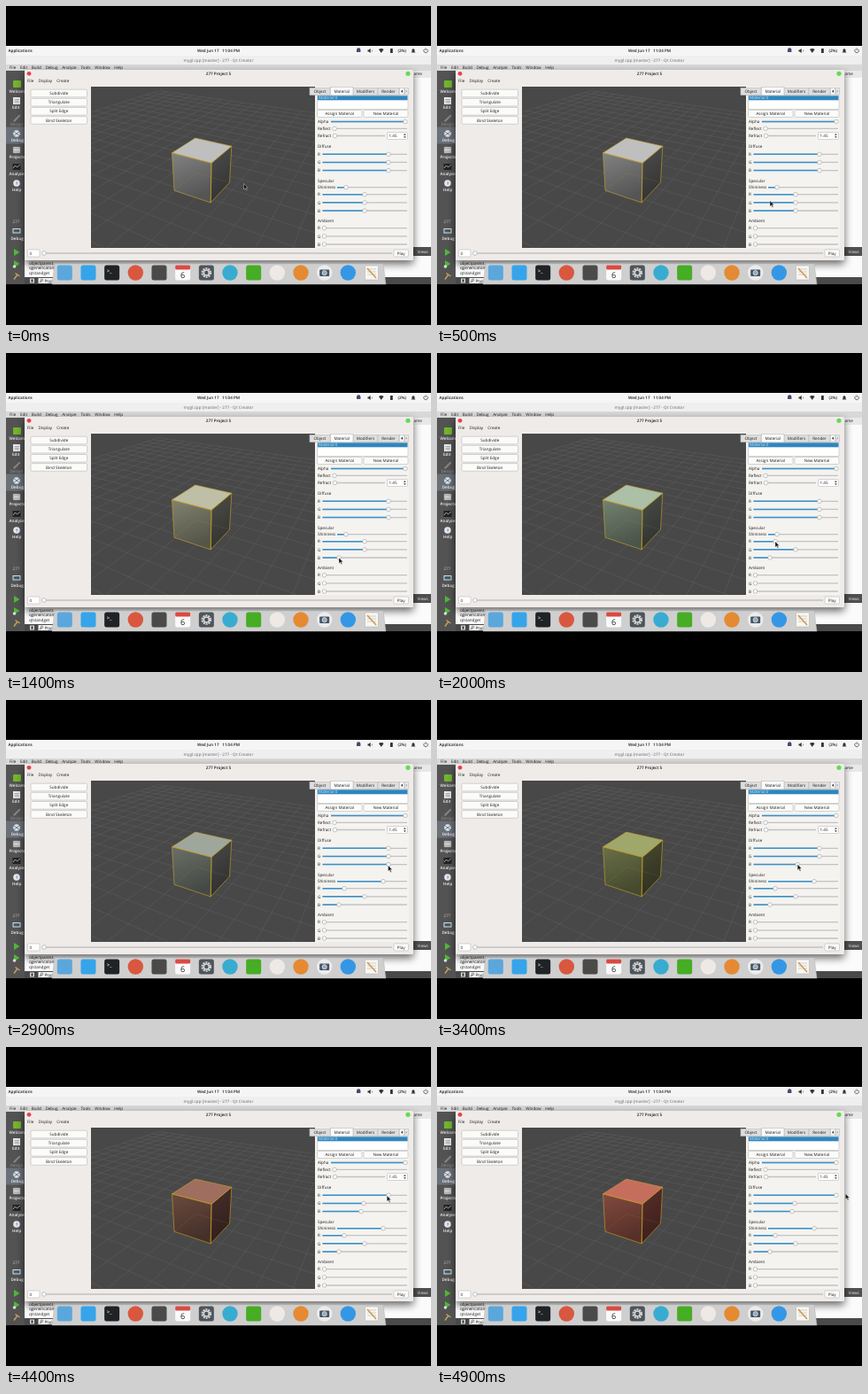
Write an HTML page that moves like this. It is 480 px wide and 360 px high and loops after 5 s.

```html
<!DOCTYPE html>
<html lang="en">
<head>
<meta charset="utf-8">
<title>Material sliders</title>
<style>
html, body { margin: 0; width: 100%; height: 100%; overflow: hidden; background: #000; }
svg { display: block; width: 100vw; height: 100vh; font: 4.6px "Open Sans", "Noto Sans", sans-serif; text-rendering: geometricPrecision; }
text { white-space: pre; }
</style>
</head>
<body>
<svg id="stage" viewBox="0 0 480 360"></svg>
<script>
const stage = document.getElementById('stage');
const parts = [];
const add = s => parts.push(s);
const rect = (x, y, w, h, fill, more = '') =>
  add(`<rect x="${x}" y="${y}" width="${w}" height="${h}" fill="${fill}" ${more}/>`);
const circle = (x, y, r, fill, more = '') =>
  add(`<circle cx="${x}" cy="${y}" r="${r}" fill="${fill}" ${more}/>`);
const path = (d, more) => add(`<path d="${d}" ${more}/>`);
const text = (x, y, s, more = '', fill = '#1c1c1c') =>
  add(`<text x="${x}" y="${y}" fill="${fill}" ${more}>${s}</text>`);
const mid = 'text-anchor="middle"';
const bold = 'font-weight="600"';
const outline = 'stroke="#b9b9b9" stroke-width=".6"';

function button(x, y, w, h, label) {
  rect(x, y, w, h, '#fbfbfa', `rx="1.2" ${outline}`);
  text(x + w / 2, y + h / 2 + 1.6, label, mid);
}

// Knobs that move later are kept by id.
const sliders = {};
function slider(x0, x1, y, value, id) {
  sliders[id] = { x0, x1, y, value };
  path(`M${x0} ${y}H${x1}`, 'stroke="#c2c2c2" stroke-width="1.3"');
  path(`M${x0} ${y}H${value}`, `id="${id}Fill" stroke="#3590c8" stroke-width="1.5"`);
  circle(value, y, 2.3, '#fcfcfc', `id="${id}Knob" stroke="#a2a2a2" stroke-width=".6"`);
}

function desktop() {
  rect(0, 45, 480, 269, '#f5f5f5');
  text(2.5, 52.2, 'Applications', bold);
  text(240, 52.2, 'Wed Jun 17   11:04 PM', mid + ' ' + bold);
  path('M396 52V49.5a2.2 2.2 0 0 1 4.4 0V52z', 'fill="#4e4670"');
  path('M408.5 49.5h1.2l2-1.5v5l-2-1.5h-1.2zM413 49q1.2 1.5 0 3', 'fill="#333"');
  path('M421 49q2.8-2.2 5.6 0L423.8 53z', 'fill="#333"');
  rect(434, 48, 2.8, 5, '#333', 'rx=".5"');
  text(442.5, 52.2, '(2%)', bold);
  path('M457.5 52.5l1-1v-1.8a1.5 1.5 0 0 1 3 0v1.8l1 1z', 'fill="#333"');
  path('M472.6 48.7a2.3 2.3 0 1 0 3 0M474.1 47.5v2.5', 'fill="none" stroke="#333" stroke-width=".7"');

  rect(0, 56, 480, 10, '#efefef');
  text(240, 62.6, 'mygl.cpp [master] - 277 - Qt Creator', mid + ' ' + bold, '#858585');
  rect(0, 66, 480, 7, '#d8d8d8');
  text(4, 71.2, 'File Edit Build Debug Analyze Tools Window Help', 'word-spacing="3.5"');
  rect(0, 73, 480, 8, '#e8e8e8');
  text(460.5, 77.8, 'ame');
  rect(460, 81, 20, 191, '#fbfbfb');
  rect(460, 272, 20, 10, '#505050');
  text(464.5, 278.5, 'Views', '', '#eee');
  rect(21, 282, 459, 24, '#fbfbfb');
  ['objectparent', 'qgenericatomic', 'qtstandget'].forEach((s, i) => text(26, 291.5 + i * 5.8, s));
  rect(0, 306, 480, 8, '#4a4a4a');
}

function sidebar() {
  rect(0, 73, 21, 241, '#535353');
  rect(0, 136.5, 21, 19, '#6a7078');
  add('<g clip-path="url(#side)">');
  ['Welcome', 'Edit', 'Design', 'Debug', 'Projects', 'Analyze', 'Help'].forEach((s, i) =>
    text(Math.max(3.5, 12 - s.length * 1.25), 97.5 + i * 18.6, s, bold, s === 'Design' ? '#858585' : '#f0f0f0'));
  text(7.5, 245, '277', '', '#c5c5c5');
  text(5.5, 263.5, 'Debug', bold, '#eee');
  add('</g>');
  rect(8, 84, 9, 8, '#72b52c', 'rx="1"');
  rect(8, 103, 8, 8, '#e8e8e8');
  path('M9.5 105.5h5M9.5 107.3h5M9.5 109h5', 'stroke="#777" stroke-width=".6"');
  path('M8 129.5l7-7 1.5 1.5-7 7z', 'fill="#858585"');
  circle(12, 144, 3.8, '#dde3ea');
  path('M8 141l8 6M16 141l-8 6', 'stroke="#46566a" stroke-width=".7"');
  path('M8 159h8v7h-8zM9 161h6M9 164h6', 'fill="#ddd" stroke="#777" stroke-width=".7"');
  rect(7.5, 178, 9, 7, '#222');
  path('M8 183l2.5-3 2 2 3.5-3', 'fill="none" stroke="#ddd" stroke-width=".7"');
  circle(12, 200, 3.8, '#e3e8ee');
  text(12, 202, '?', mid + ' font-weight="700"', '#4775a3');
  rect(7.5, 251, 9, 5.5, '#dedede');
  rect(8.5, 252, 7, 3.5, '#405e70');
  path('M9 274v8l6.5-4zM9 287v8l6.5-4z', 'fill="#4dba35"');
  circle(9.5, 294, 1.8, '#ddd');
  path('M9 308.5l4-5.5M10.5 301.5l5 3.5', 'stroke="#c3a05b" stroke-width="1.5"');
  rect(27, 307.5, 5, 5, '#ddd');
  rect(28.5, 308.5, 2, 3, '#333');
  rect(36.5, 307, 20, 6, '#f5f5f5');
  path('M38 312l1.8-2', 'stroke="#333" stroke-width=".8"');
  circle(40.5, 309.3, 1.2, 'none', 'stroke="#333" stroke-width=".6"');
  text(43.5, 311.8, 'Ptype');
}

// Orbiting camera aimed at the origin; null when a point is too close.
const TURN = 30 * Math.PI / 180, TILT = 28.5 * Math.PI / 180, DIST = 6.5, FOCAL = 308;
function project(x, y, z) {
  const side = x * Math.cos(TURN) + z * Math.sin(TURN);
  const ahead = z * Math.cos(TURN) - x * Math.sin(TURN);
  const depth = DIST + ahead * Math.cos(TILT) - y * Math.sin(TILT);
  const up = ahead * Math.sin(TILT) + y * Math.cos(TILT);
  return depth < .5 ? null
    : [222 + FOCAL * side / depth, 183.5 - FOCAL * up / depth].map(v => +v.toFixed(1));
}

function line(points) {
  let d = '', pen = 'M';
  for (const p of points.map(q => project(...q))) {
    if (p) d += pen + p.join(' ');
    pen = p ? 'L' : 'M';
  }
  return d;
}

function gridPath(half, cell) {
  const marks = Array.from({ length: 2 * half / cell + 1 }, (_, i) => i * cell - half);
  return marks.map(a => line(marks.map(b => [a, 0, b])) + line(marks.map(b => [b, 0, a]))).join('');
}

// Corners run clockwise from the left: left, back, right, front.
const corner = (i, y) => [i < 2 ? -.5 : .5, y, i % 3 ? .5 : -.5];
const loop = points => line(points) + 'z';
const wall = (a, b) => loop([corner(a, .5), corner(b, .5), corner(b, -.5), corner(a, -.5)]);
const faces = {
  top: { d: loop([0, 1, 2, 3].map(i => corner(i, .5))), diffuse: .76, shine: .36 },
  left: { d: wall(0, 3), diffuse: .5, shine: .28 },
  right: { d: wall(3, 2), diffuse: .36, shine: .06 }
};

function viewport() {
  rect(96, 91, 253, 182, '#484848');
  path(gridPath(6, .5), 'clip-path="url(#view)" fill="none" stroke="#767676" stroke-width=".4" opacity=".6"');
  const thin = 'fill="none" stroke-linejoin="round" stroke="#c9a42a"';
  for (const id in faces) {
    path(faces[id].d, `id="${id}"`);
    if (id !== 'top') path(faces[id].d, 'fill="url(#shade)"');
  }
  path(line([0, 1, 2].map(i => corner(i, -.5))), thin + ' stroke-width=".4" opacity=".3"');
  for (const id in faces) path(faces[id].d, thin + ' stroke-width=".6"');
}

function tab(x, w, label, active) {
  rect(x, active ? 91.5 : 92.5, w, active ? 9.5 : 8, active ? '#fafafa' : '#dedede', outline);
  text(x + w / 2, 98, label, mid);
}

function colorGroup(title, y, value, key) {
  text(352, y, title);
  [...'RGB'].forEach((c, i) => {
    const rowY = y + (key === 'spec' ? 13.7 : 7.1) + i * 9.15;
    text(352, rowY + 1.7, c);
    slider(357.5, 453, rowY, value, key + c);
  });
}

function panel() {
  rect(349, 91, 106, 182, '#f4f3f0');
  add('<g clip-path="url(#view)">');
  tab(343, 23, 'Object');
  tab(392, 28, 'Modifiers');
  tab(420, 24, 'Render');
  tab(366.5, 25.5, 'Material', true);
  rect(444.5, 92.5, 5, 7.5, '#fafafa', outline);
  rect(450, 92.5, 4.5, 7.5, '#e8e8e8', outline);
  path('M448 94.5v3.6l-2-1.8z', 'fill="#333"');
  path('M451.5 94.5v3.6l1.8-1.8z', 'fill="#aaa"');
  rect(351.5, 101, 102.5, 15.5, '#fff', outline);
  rect(352, 101.3, 101.5, 5, '#2f86bd');
  text(353, 105.3, 'Material 0', '', '#d8edf8');
  button(351.5, 117.5, 50.5, 8, 'Assign Material');
  button(404, 117.5, 50, 8, 'New Material');
  text(352, 132, 'Alpha');
  slider(367, 453, 130.5, 451, 'alpha');
  text(352, 139.8, 'Reflect');
  slider(370, 453, 138.3, 371, 'reflect');
  text(352, 148.2, 'Refract');
  slider(371, 428, 146.5, 371.5, 'refract');
  rect(430.5, 142.5, 23, 8, '#fff', `rx="1" ${outline}`);
  text(432.5, 148.2, '1.45');
  path('M449 145.8l1.4-1.8 1.4 1.8zM449 147.3l1.4 1.8 1.4-1.8z', 'fill="#333"');
  colorGroup('Diffuse', 160.2, 432, 'diff');
  colorGroup('Specular', 199, 405, 'spec');
  text(352, 206.3, 'Shininess');
  slider(374, 453, 204.7, 384, 'shine');
  colorGroup('Ambient', 243.6, 359.5, 'amb');
  add('</g>');
}

function appWindow() {
  rect(21, 76, 439, 215, '#000', 'opacity=".6" filter="url(#blur)" clip-path="url(#desk)"');
  rect(21, 72, 439, 215, '#efebe9', 'rx="1.5"');
  circle(26, 76.3, 2.4, '#e8404a');
  circle(454, 76.3, 2.6, '#62dc52');
  text(240, 78, '277 Project 5', mid + ' ' + bold);
  text(24, 85.5, 'File Display Create', 'word-spacing="4"');
  ['Subdivide', 'Triangulate', 'Split Edge', 'Bind Skeleton']
    .forEach((s, i) => button(28, 94.2 + i * 10.15, 63.5, 8.6, s));
  viewport();
  panel();
  rect(24.5, 275, 13.5, 8, '#fff', `rx="1" ${outline}`);
  text(26.5, 280.8, '0');
  slider(41, 436, 279, 43, 'time');
  button(438, 275, 16.5, 8, 'Play');
}

function dock() {
  path('M55 291H426L429 314H52z', 'fill="#cfcfcf" stroke="#b5b5b5" stroke-width=".5"');
  const at = i => 66.3 + i * 26.67;
  const tiles = { 0: '#5ba7dc', 1: '#36a4ea', 2: '#202326', 4: '#4b4a48', 5: '#fafafa', 6: '#4e555b', 8: '#46ad24' };
  const discs = { 3: '#d9573f', 7: '#38acd0', 9: '#efe9e5', 10: '#e58a32', 11: '#ececec', 12: '#3497e6' };
  for (const i in tiles) rect(at(i) - 8.5, 292.5, 17, 17, tiles[i], 'rx="2.5"');
  for (const i in discs) circle(at(i), 301, 8.7, discs[i]);
  text(at(2) - 6, 301, '&gt;_', 'font-size="6" ' + bold, '#e5e5e5');
  rect(at(5) - 8.5, 292.5, 17, 5, '#d94a42', 'rx="1.5"');
  text(at(5), 306.5, '6', mid + ' font-size="9"');
  circle(at(6), 301, 4.8, 'none', 'stroke="#dadada" stroke-width="2" stroke-dasharray="2 1.015"');
  circle(at(6), 301, 3, '#4e555b', 'stroke="#dadada" stroke-width="1.5"');
  rect(at(11) - 5.5, 297.5, 11, 7.5, '#495563', 'rx="1"');
  circle(at(11), 301.2, 2.6, '#8eabc2', 'stroke="#eee" stroke-width=".7"');
  rect(at(13) - 7.5, 293, 15, 16, '#f8f6ef', 'rx="1" stroke="#aaa" stroke-width=".5"');
  path('M408 297h10M408 300h10M408 303h10', 'stroke="#b5c2c6" stroke-width=".7"');
  path('M408 296l10 11', 'stroke="#d39852" stroke-width="1.6"');
}

add(`<defs>
  <clipPath id="desk"><rect y="45" width="480" height="269"/></clipPath>
  <clipPath id="side"><rect y="73" width="21" height="241"/></clipPath>
  <clipPath id="view"><rect x="96" y="91" width="253" height="182"/><rect x="349" y="91" width="106" height="181.5"/></clipPath>
  <filter id="blur"><feGaussianBlur stdDeviation="5"/></filter>
  <linearGradient id="shade" x1="0" y1="0" x2=".3" y2="1"><stop stop-opacity="0"/><stop offset="1" stop-opacity=".35"/></linearGradient>
</defs>`);
rect(0, 0, 480, 360, '#000');
desktop();
sidebar();
appWindow();
dock();
path('M0 0V6.5L1.5 5L2.7 7.6L3.7 7.1L2.5 4.7H4.6z',
  'id="cursor" fill="#111" stroke="#e8e8e8" stroke-width=".4"');
stage.innerHTML = parts.join('');

const LOOP = 5000, STEP = 100;
const pick = id => document.getElementById(id);
const mix = (a, b, k) => a + (b - a) * k;
const clamp = v => Math.min(1, Math.max(0, v));

const drags = [
  { id: 'specB', start: 1000, end: 1400, to: 376 },
  { id: 'specR', start: 1600, end: 2000, to: 382 },
  { id: 'shine', start: 2200, end: 2600, to: 426 },
  { id: 'diffB', start: 3000, end: 3500, to: 401 },
  { id: 'diffG', start: 4000, end: 4250, to: 404 },
  { id: 'diffR', start: 4450, end: 4750, to: 451 }
];

// The pointer enters, visits both ends of every drag, then leaves.
const stops = [{ t: 0, x: 268.5, y: 200.5 }, { t: 900, x: 402.5, y: 224.5 }];
for (const { id, start, end, to } of drags) {
  const { value, y } = sliders[id];
  stops.push({ t: start, x: value, y, drag: true }, { t: end, x: to, y });
}
stops.push({ t: 4900, x: 461.3, y: 165.5 });

function pointer(t) {
  const i = Math.max(1, stops.findIndex(s => s.t >= t));
  const a = stops[i - 1], b = stops[i];
  const k = (t - a.t) / (b.t - a.t);
  const eased = a.drag ? k : 1 - (1 - k) ** 2;
  return [mix(a.x, b.x, eased), mix(a.y, b.y, eased)];
}

const level = {};
function setSlider(id, x) {
  const { x0, x1, y } = sliders[id];
  level[id] = (x - x0) / (x1 - x0);
  pick(id + 'Fill').setAttribute('d', `M${x0} ${y}H${x}`);
  pick(id + 'Knob').setAttribute('cx', x);
}

// Diffuse light plus a highlight that narrows with shininess.
function shade({ diffuse, shine }) {
  const rgb = [...'RGB'].map(c =>
    Math.round(255 * clamp(level['diff' + c] * diffuse + level['spec' + c] * shine * (1 - level.shine))));
  return `rgb(${rgb})`;
}

function draw(now) {
  const t = Math.floor(now % LOOP / STEP) * STEP;
  for (const { id, start, end, to } of drags)
    setSlider(id, mix(sliders[id].value, to, clamp((t - start) / (end - start))));
  for (const id in faces) pick(id).setAttribute('fill', shade(faces[id]));
  pick('cursor').setAttribute('transform', `translate(${pointer(t)})`);
}

setSlider('specG', sliders.specG.value);
const begin = performance.now();
function tick() {
  draw(performance.now() - begin);
  requestAnimationFrame(tick);
}
draw(0);
requestAnimationFrame(tick);
</script>
</body>
</html>
```
